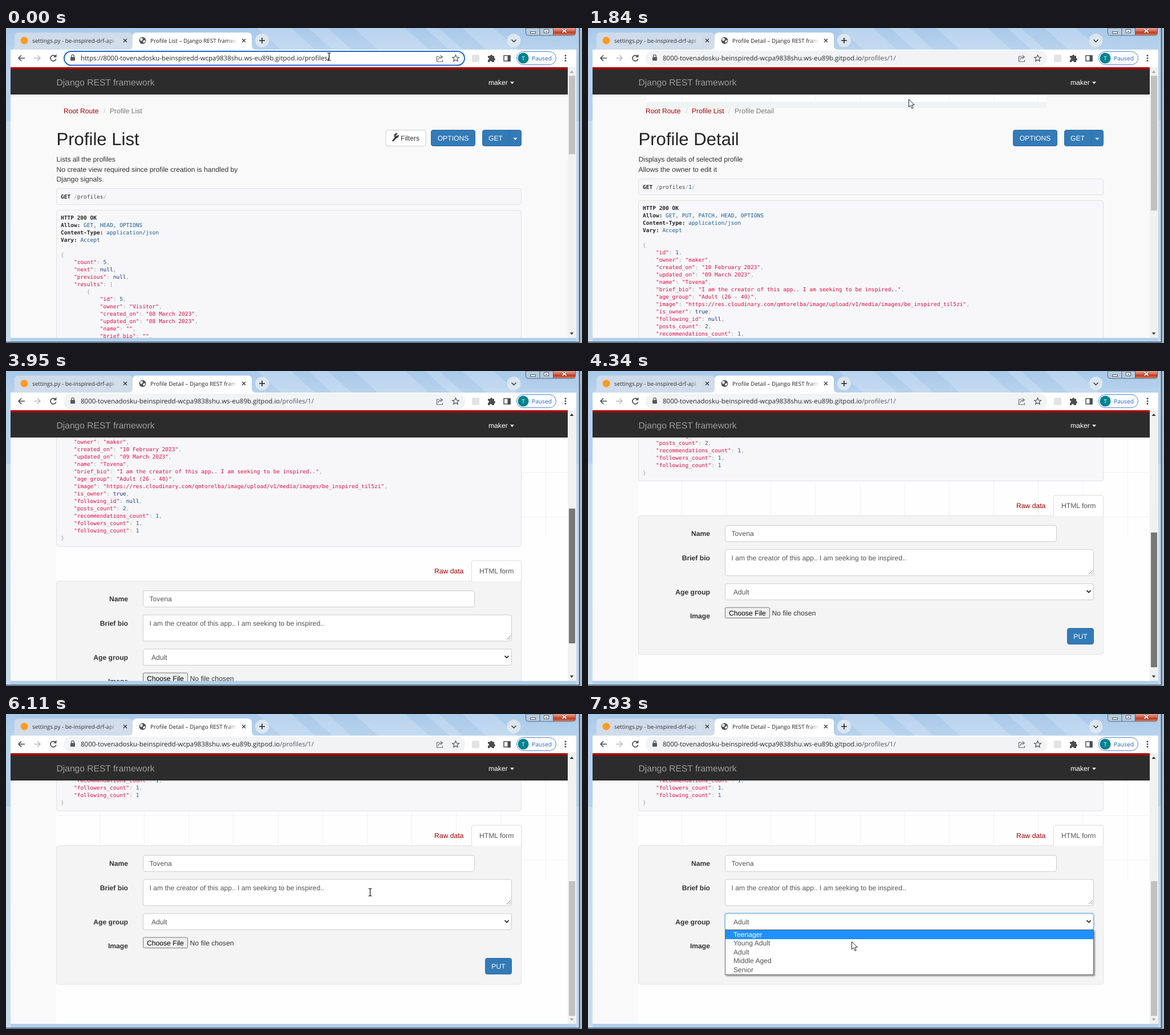
An HTML page for the animation above (7.99 s loop, 1010 by 554 pixels).

```html
<!DOCTYPE html>
<html lang="en">
<head>
<meta charset="utf-8">
<title>API browser</title>
<style>
html, body { margin: 0; width: 100%; height: 100%; overflow: hidden; background: #b9d1ea; }
svg { display: block; width: 1010px; height: 554px; font: 12.15px "Liberation Sans", Arial, sans-serif; }
text { white-space: pre; text-rendering: geometricPrecision; }
.ui { font-family: "Open Sans", "Noto Sans", sans-serif; }
.code { font: 9.52px "DejaVu Sans Mono", "Noto Sans Mono", monospace; }
</style>
</head>
<body>
<svg id="stage" viewBox="0 0 1010 554"></svg>
<script>
const LOOP = 7990;
const HOST = '8000-tovenadosku-beinspiredd-wcpa9838shu.ws-eu89b.gitpod.io';
const RED = '#a30000', BLUE = '#337ab7', INK = '#333';

const text = (x, y, s, attrs = '') => `<text x="${x}" y="${y}" ${attrs}>${s}</text>`;
const rect = (x, y, w, h, fill, attrs = '') =>
  `<rect x="${x}" y="${y}" width="${w}" height="${h}" fill="${fill}" ${attrs}/>`;
const line = (d, stroke, width = 1, attrs = '') =>
  `<path d="${d}" fill="none" stroke="${stroke}" stroke-width="${width}" ${attrs}/>`;
const shape = (d, fill, attrs = '') => `<path d="${d}" fill="${fill}" ${attrs}/>`;
const group = (id, body, attrs = '') => `<g id="${id}" ${attrs}>${body}</g>`;
const span = (s, fill) => `<tspan fill="${fill}">${s}</tspan>`;
const bold = s => `<tspan font-weight="700" fill="#222">${s}</tspan>`;
const box = (x, y, w, h, fill, stroke, r = 3.5) => rect(x, y, w, h, fill, `rx="${r}" stroke="${stroke}"`);
const button = (x, y, w, label, center = x + w / 2) => box(x + .5, y + .5, w - 1, 28, BLUE, '#2e6da4') +
  text(center, y + 19, label, 'fill="#fff" text-anchor="middle"');

// Browser window

function windowFrame() {
  let s = rect(0, 0, 1010, 554, 'url(#glass)');
  for (const [x, w] of [[440, 60], [530, 34], [610, 90], [735, 24], [800, 55]])
    s += shape(`M${x} 0l42 38h${w}l-42-38z`, '#fff', 'opacity=".18"');
  s += rect(0, 163, 8, 390, '#d4e4f4', 'opacity=".6"') + rect(1000, 163, 6, 390, '#d4e4f4', 'opacity=".5"');
  s += rect(1006, 0, 4, 554, '#a9bccf') + line('M1005.5 0V552M0 552.5H1006', '#35475a', 1.5);
  s += rect(0, 553, 1010, 1, '#8fa3b7');
  s += shape('M911.5 0H998.5V9q0 4-4 4H915.5q-4 0-4-4z', '#b7cbdf', 'stroke="#52677e"');
  s += shape('M960 0H998V9q0 3.5-3.5 3.5H960z', 'url(#close)') + line('M936 0V13M959.5 0V13', '#52677e');
  s += rect(919.5, 6.5, 9, 3, '#fff', 'stroke="#4e5c6b"') + rect(943.5, 2.5, 8, 6, '#fff', 'stroke="#4e5c6b"') + rect(946, 5, 3, 1.5, '#4e5c6b');
  s += line('M975.5 2l7 6M982.5 2l-7 6', '#5f2a20', 3.5) + line('M975.5 2l7 6M982.5 2l-7 6', '#fff', 2);
  return s;
}

function tabs() {
  const cross = x => line(`M${x - 3} 19l6 6m0-6l-6 6`, '#333', 1.3);
  let s = shape('M8 38q7 0 7-7V15q0-7 7-7H215q7 0 7 7V38z', '#d5dfe9', 'opacity=".85"');
  s += shape('M215 38q7 0 7-7V15q0-7 7-7H424q7 0 7 7V31q0 7 7 7z', '#fff');
  s += '<circle cx="32" cy="22" r="6.5" fill="#ff9a1f"/>' + cross(209) + cross(417);
  s += text(46, 26, 'settings.py - be-inspired-drf-api', 'class="ui" font-size="9.9" fill="#333"');
  s += rect(176, 12, 24, 20, 'url(#fadeGrey)');
  s += '<circle cx="239.5" cy="22" r="6" fill="#505459"/>' +
    shape('M235 19q3-3 5 0l-1 3-3 1zM240 23l4-2q1 4-3 5z', '#fff');
  s += text(253, 26, '', 'id="title" class="ui" font-size="9.9" fill="#222"') + rect(386, 12, 20, 20, 'url(#fadeWhite)');
  s += '<circle cx="449" cy="22" r="12" fill="#dce6f0"/>' + line('M444 22h10M449 17v10', '#222', 1.6);
  s += '<circle cx="890.5" cy="22" r="12" fill="#dce6f0"/>' + line('M886.5 20.5l4 4 4-4', '#333', 1.5);
  return s;
}

function toolbar() {
  let s = rect(8, 38, 992, 31, '#fff');
  s += line('M33 53H22m5-5l-5 5 5 5', '#4a4d51', 1.6) + line('M49 53h11m-5-5l5 5-5 5', '#babcbe', 1.6);
  s += line('M87 50a5 5 0 1 0 .8 4.5', '#4a4d51', 1.7) + shape('M88.5 46v5.5h-5.5z', '#4a4d51');
  s += group('omnibox', '');
  s += rect(113, 51, 8, 6.5, '#55585c', 'rx="1"') + line('M114.7 51v-1.5a2.3 2.3 0 0 1 4.6 0V51', '#55585c', 1.3);
  s += text(131, 57, '', 'id="url" class="ui" font-size="11.5" fill="#26282b"');
  s += line('M760 50h-4.5v9h10v-3M758 56q1-5 6-5m-2.5-3l4 3-4 3', '#63676b', 1.2);
  s += line('M788.5 47.5l1.7 3.8 4.1.4-3.1 2.7.9 4-3.6-2.1-3.6 2.1.9-4-3.1-2.7 4.1-.4z', '#4a4d51', 1.2);
  s += rect(817, 47, 13, 13, '#e3e3e3', 'rx="2"');
  s += shape('M845 49h4a2 2 0 0 1 4 0h3v4a2 2 0 0 1 0 4v3h-4a2 2 0 0 0-4 0h-3v-4a2 2 0 0 0 0-4z', '#4a4d51');
  s += rect(873, 48.5, 11, 9.5, '#fff', 'stroke="#4a4d51" stroke-width="1.5"') + rect(879.5, 48, 5, 11, '#4a4d51');
  s += box(895.5, 41.5, 69, 23, '#fdfeff', '#4f86d9', 11.5) + '<circle cx="907" cy="53" r="9.5" fill="#00838f"/>';
  s += text(907, 56.5, 'T', 'class="ui" font-size="10" fill="#fff" text-anchor="middle"');
  s += text(922, 56.5, 'Paused', 'class="ui" font-size="10.2" fill="#2a62c0"');
  for (const y of [48.5, 53, 57.5]) s += `<circle cx="981" cy="${y}" r="1.5" fill="#4a4d51"/>`;
  return s;
}

function suggestions() {
  const row = (y, tail, fill) => rect(102, y, 702, 34, fill) +
    `<circle cx="117" cy="${y + 17}" r="5.5" fill="#5f6368"/>` +
    text(131, y + 21, `${HOST}/profiles/${tail}`, 'class="ui" font-size="11.5" fill="#1a62c8"');
  return rect(101, 40, 704, 105, '#fff', 'rx="13" filter="url(#shadow)"') +
    line('M102 67.5H804', '#dfe1e5') + row(70, '1/', '#e8eaed') + row(104, '', '#fff');
}

// Page content

const TOKEN = /"[^"]*"|\d+|true|null|[^"\dtn]+|./g;
const tokenColor = s => s[0] === '"' ? '#d14' : /^\d/.test(s) ? '#195f91' : /^(true|null)$/.test(s) ? '#1e347b' : '#93a1a1';
const json = s => s.match(TOKEN).map(p => span(p, tokenColor(p))).join('');
const header = (name, value) => bold(name + ':') + ' ' + span(value, '#195f91');

function response(top, height, allow, body) {
  const rows = [bold('HTTP 200 OK'), header('Allow', allow), header('Content-Type', 'application/json'),
    header('Vary', 'Accept'), '', ...body.map(json)];
  return box(88.5, top + .5, 815, height, '#f7f7f9', '#e1e1e8') +
    rows.map((r, i) => text(96, top + 16.5 + 13 * i, r, 'class="code"')).join('');
}

function heading(crumbs, title, notes, path, pathTop) {
  let s = crumbs;
  s += text(88.5, 206, title, 'font-size="31.1" fill="#222"');
  notes.forEach((n, i) => s += text(88.5, 235 + 17.5 * i, n, `fill="${INK}"`));
  s += button(745, 179, 78, 'OPTIONS') + button(835, 179, 69, 'GET', 858.5);
  s += line('M882.5 180V207', '#2e6da4') + shape('M889.5 193h7l-3.5 4z', '#fff');
  s += box(88.5, pathTop + .5, 815, 28, '#f7f7f9', '#e1e1e8');
  return s + text(96, pathTop + 17.5, `${bold('GET')} ${path}`, 'class="code"');
}

const crumb = (x, s, link) => text(x, 150, s, `fill="${link ? RED : '#777'}"`);
const slash = x => text(x, 150, '/', 'fill="#ccc"');
const grey = s => span(s, '#93a1a1'), dark = s => span(s, '#48484c');

function listPage() {
  const crumbs = crumb(101, 'Root Route', true) + slash(171) + crumb(182, 'Profile List');
  const pad = ' '.repeat(12);
  const body = ['{', '    "count": 5,', '    "next": null,', '    "previous": null,', '    "results": [', '        {',
    ...['"id": 5', '"owner": "Visitor"', '"created_on": "08 March 2023"', '"updated_on": "08 March 2023"', '"name": ""', '"brief_bio": ""']
      .map(r => pad + r + ',')];
  const filters = box(666, 179.5, 70, 28, '#fff', '#ccc') + text(692, 198, 'Filters', `fill="${INK}"`) +
    line('M678.5 198l6-6', INK, 2.6, 'stroke-linecap="round"') + line('M688 188.5l-2.5 2.5-2-.5-.5-2 2.5-2.5a3.5 3.5 0 1 0 2.5 2.5', INK, 1.5);
  return heading(crumbs, 'Profile List', ['Lists all the profiles',
    'No create view required since profile creation is handled by', 'Django signals.'],
    grey('/') + dark('profiles') + grey('/'), 282) + filters + response(320, 400, 'GET, HEAD, OPTIONS', body);
}

function detailPage() {
  const crumbs = crumb(101, 'Root Route', true) + slash(171) + crumb(182, 'Profile List', true) + slash(246) + crumb(257, 'Profile Detail');
  const fields = ['"id": 1', '"owner": "maker"', '"created_on": "10 February 2023"', '"updated_on": "09 March 2023"',
    '"name": "Tovena"', '"brief_bio": "I am the creator of this app.. I am seeking to be inspired.."', '"age_group": "Adult (26 - 40)"',
    '"image": "https://res.cloudinary.com/qmtorelba/image/upload/v1/media/images/be_inspired_til5zi"', '"is_owner": true',
    '"following_id": null', '"posts_count": 2', '"recommendations_count": 1', '"followers_count": 1', '"following_count": 1'];
  const body = ['{', ...fields.map((f, i) => '    ' + f + (i < fields.length - 1 ? ',' : '')), '}'];
  return heading(crumbs, 'Profile Detail', ['Displays details of selected profile', 'Allows the owner to edit it'],
    grey('/') + dark('profiles') + grey('/') + span('1', '#195f91') + grey('/'), 265) +
    response(303, 288, 'GET, PUT, PATCH, HEAD, OPTIONS', body) + group('form', form(), 'transform="translate(0 421)"');
}

function form() {
  const label = (y, s) => text(214, y, s, `font-weight="700" text-anchor="end" fill="${INK}"`);
  const value = (x, y, s) => text(x, y, s, 'fill="#555"');
  let s = box(88.5, 231.5, 815, 244, '#f4f4f4', '#e3e3e3');
  s += shape('M816.5 232V199q0-3.5 3.5-3.5H900q3.5 0 3.5 3.5V232', '#fff', 'stroke="#ddd"');
  s += text(751, 217.5, 'Raw data', `fill="${RED}"`) + text(830, 217.5, 'HTML form', 'fill="#555"');
  s += label(267, 'Name') + label(309.5, 'Brief bio') + label(369.5, 'Age group') + label(412, 'Image');
  s += box(240.5, 248.5, 581, 28.5, '#fff', '#ccc') + value(251.5, 267, 'Tovena');
  s += box(240.5, 291, 646, 46, '#fff', '#ccc') + value(251.5, 309.5, 'I am the creator of this app.. I am seeking to be inspired..');
  s += line('M878 334.5l7-7M882 334.5l3-3', '#777');
  s += group('select', '') + value(255, 369.5, 'Adult') + line('M874.5 363l3.5 3.5 3.5-3.5', '#333', 1.8);
  s += box(240.5, 393, 78, 18.5, '#efefef', '#767676', 2) + text(247, 406.5, 'Choose File') + text(322.5, 406.5, 'No file chosen', `fill="${INK}"`);
  return s + button(840, 429, 47, 'PUT');
}

function gridLines() {
  let d = 'M904 178.5H985M904 256.5H985M88 178.5H904';
  for (let i = 0; i < 11; i++) d += `M${Math.round(164 + 78.15 * i) + .5} 117V292`;
  return line(d, '#f1f1f1');
}

function options(active) {
  const names = ['Teenager', 'Young Adult', 'Adult', 'Middle Aged', 'Senior'];
  return rect(240.5, 379.5, 646, 79, '#fff', 'stroke="#666" filter="url(#drop)"') +
    rect(241, 380 + 15.5 * active, 645, 16, '#1e90ff') +
    names.map((n, i) => text(255, 391.8 + 15.45 * i, n, `fill="${i === active ? '#fff' : '#555'}"`)).join('');
}

const gradient = (id, vertical, ...stops) => `<linearGradient id="${id}" x2="${vertical ? 0 : 1}" y2="${vertical ? 1 : 0}">` +
  stops.map(([o, c, a = 1]) => `<stop offset="${o}" stop-color="${c}" stop-opacity="${a}"/>`).join('') + '</linearGradient>';

const stage = document.getElementById('stage');
stage.innerHTML = '<defs>' +
  gradient('glass', true, [0, '#a9c9ea'], [.07, '#b7d2ec'], [1, '#b4cfe9']) +
  gradient('close', true, [0, '#e2a294'], [.5, '#cf5f49'], [.55, '#b93a22'], [1, '#d4704f']) +
  gradient('fadeGrey', false, [0, '#d3dfeb', 0], [1, '#d3dfeb']) + gradient('fadeWhite', false, [0, '#fff', 0], [1, '#fff']) +
  '<filter id="shadow" x="-5%" y="-20%" width="110%" height="150%"><feDropShadow dx="0" dy="2" stdDeviation="3.5" flood-opacity=".3"/></filter>' +
  '<filter id="drop" x="-5%" y="-10%" width="110%" height="130%"><feDropShadow dx="2" dy="2" stdDeviation="1.5" flood-opacity=".4"/></filter>' +
  '<clipPath id="view"><path d="M8 117H985V545H8z"/></clipPath></defs>' +
  windowFrame() + tabs() + toolbar() +
  rect(8, 69, 992, 476, '#f9f9f9') +
  '<g clip-path="url(#view)">' +
    group('bare', rect(88, 117, 897, 428, '#fefefe') + gridLines()) +
    group('trace', `<svg x="102" y="117" width="702" height="13" style="width:702px;height:13px" viewBox="102 117 702 13">${rect(102, 117, 702, 13, '#fff') + gridLines()}</svg>` + rect(102, 130, 702, 11, '#f0f3f3')) +
    group('list', listPage()) + group('detail', detailPage()) + group('menu', '') + '</g>' +
  rect(8, 69, 977, 48, '#2c2c2c') + rect(8, 69, 977, 4, RED) +
  text(88.5, 100.5, 'Django REST framework', 'font-size="15.6" fill="#9d9d9d"') +
  text(846, 100, 'maker', 'fill="#fff"') + shape('M884 94.5h7l-3.5 4z', '#fff') +
  rect(985, 69, 15, 476, '#f1f1f1') + rect(987, 84, 11, 0, '#c1c1c1', 'id="thumb"') +
  shape('M988.5 79h7l-3.5-4z', '#a3a3a3', 'id="up"') + shape('M988.5 535.5h7l-3.5 4z', '#505050', 'id="down"') +
  group('suggest', suggestions()) + group('typed', '') +
  group('arrow', shape('M0 0V13.5l3.2-3 2.3 5.5 2.2-1-2.3-5.3H10z', '#fff', 'stroke="#223" stroke-linejoin="round"')) +
  group('beam', line('M-3-6.5h2l1 1 1-1h2M-3 6.5h2l1-1 1 1h2M0-5.5v11', '#111', 1.2));

const el = Object.fromEntries([...stage.querySelectorAll('[id]')].map(n => [n.id, n]));
const show = (node, on) => node.setAttribute('display', on ? 'inline' : 'none');

// Suggestions cover the address bar, so its text is repeated above them.
el.typed.innerHTML = text(131, 57, '', 'class="ui" font-size="11.5" fill="#26282b"') + '<circle cx="117" cy="53" r="5" fill="#5f6368"/>';
const typedText = el.typed.firstChild;

// Motion: [start, end, steps, x, y]
const MOVES = [
  [0, 0, 1, 566, 50], [1840, 1840, 1, 562, 125], [1920, 2490, 9, 990, 160], [2670, 2720, 2, 995, 201],
  [3340, 3550, 4, 1001, 221], [3810, 3880, 2, 1020, 300], [4900, 4900, 1, 1020, 368], [5030, 5200, 4, 716, 297],
  [5390, 5560, 4, 544, 257], [5870, 6040, 4, 636, 320], [6110, 6110, 1, 638, 313], [6670, 6900, 5, 534, 353],
  [7090, 7270, 4, 533, 366], [7810, 7930, 3, 462, 400]];
// [time, page offset, thumb offset]
const SCROLL = [[0, 0, 0], [3340, 6, 3], [3400, 19, 10], [3470, 30, 15], [3550, 42, 21], [3810, 90, 55], [3880, 190, 110],
  [3950, 283, 158], [4030, 350, 180], [4100, 386, 193], [4340, 398, 200], [4410, 412, 206], [4490, 421, 210]];
const THUMB = [[0, '#c1c1c1'], [2490, '#a8a8a8'], [2720, '#787878'], [4830, '#c1c1c1']];

const lastIndex = (keys, t) => keys.findLastIndex(k => k[0] <= t);
const current = (keys, t) => keys[lastIndex(keys, t)];
const smooth = k => k * k * (3 - 2 * k);

function pointer(t) {
  const i = lastIndex(MOVES, t);
  const [start, end, steps, x, y] = MOVES[i];
  const [, , , x0, y0] = MOVES[Math.max(0, i - 1)];
  const progress = end > start ? Math.min(1, (t - start) / (end - start)) : 1;
  const k = smooth((Math.round(progress * (steps - 1)) + 1) / steps);
  return [x0 + (x - x0) * k, y0 + (y - y0) * k];
}

function render(t) {
  const detail = t >= 950, focused = t < 840, open = t >= 310 && focused;
  const [, offset, thumb] = current(SCROLL, t);
  show(el.list, !detail);
  show(el.detail, detail);
  show(el.bare, t >= 3550);
  show(el.trace, t >= 950 && t < 1920);
  show(el.suggest, open);
  show(el.typed, open);
  el.detail.setAttribute('transform', `translate(0 ${-offset})`);
  el.title.textContent = detail ? 'Profile Detail – Django REST fram' : 'Profile List – Django REST framew';
  el.omnibox.innerHTML = focused ? rect(102, 41, 702, 24.5, '#fff', 'rx="12.5" stroke="#1a66cf" stroke-width="2"')
    : rect(101, 40, 704, 26.5, '#f1f3f4', 'rx="13"');
  const path = '/profiles/' + (t < 310 ? '' : t < 410 ? '1' : '1/');
  el.url.innerHTML = focused ? `https://${HOST}${path}` : HOST + span(path, '#55595e');
  typedText.textContent = `https://${HOST}${path}`;

  el.thumb.setAttribute('y', 84 + thumb);
  el.thumb.setAttribute('height', detail ? 237 : 138);
  el.thumb.setAttribute('fill', current(THUMB, t)[1]);
  el.up.setAttribute('fill', offset ? '#303030' : '#a3a3a3');
  el.down.setAttribute('fill', offset === 421 ? '#a3a3a3' : '#404040');

  const picking = t >= 7510;
  el.select.innerHTML = (picking ? rect(238.5, 349, 650, 32.5, '#66afe9', 'rx="5" opacity=".35"') : '') +
    box(240.5, 351, 646, 28.5, '#fff', picking ? '#66afe9' : '#ccc');
  show(el.menu, t >= 7570);
  el.menu.innerHTML = options(t >= 7810 ? 0 : 2);

  const [x, y] = pointer(t);
  const inField = x > 240 && ((y > 248 && y < 278 && x < 822) || (y > 290 && y < 338 && x < 887));
  const beam = y < 80 || inField;
  show(el.beam, beam);
  show(el.arrow, !beam);
  (beam ? el.beam : el.arrow).setAttribute('transform', `translate(${Math.round(x) + .5} ${Math.round(y) + .5})`);
}

const begin = performance.now();
(function frame() {
  render((performance.now() - begin) % LOOP);
  requestAnimationFrame(frame);
})();
</script>
</body>
</html>
```
